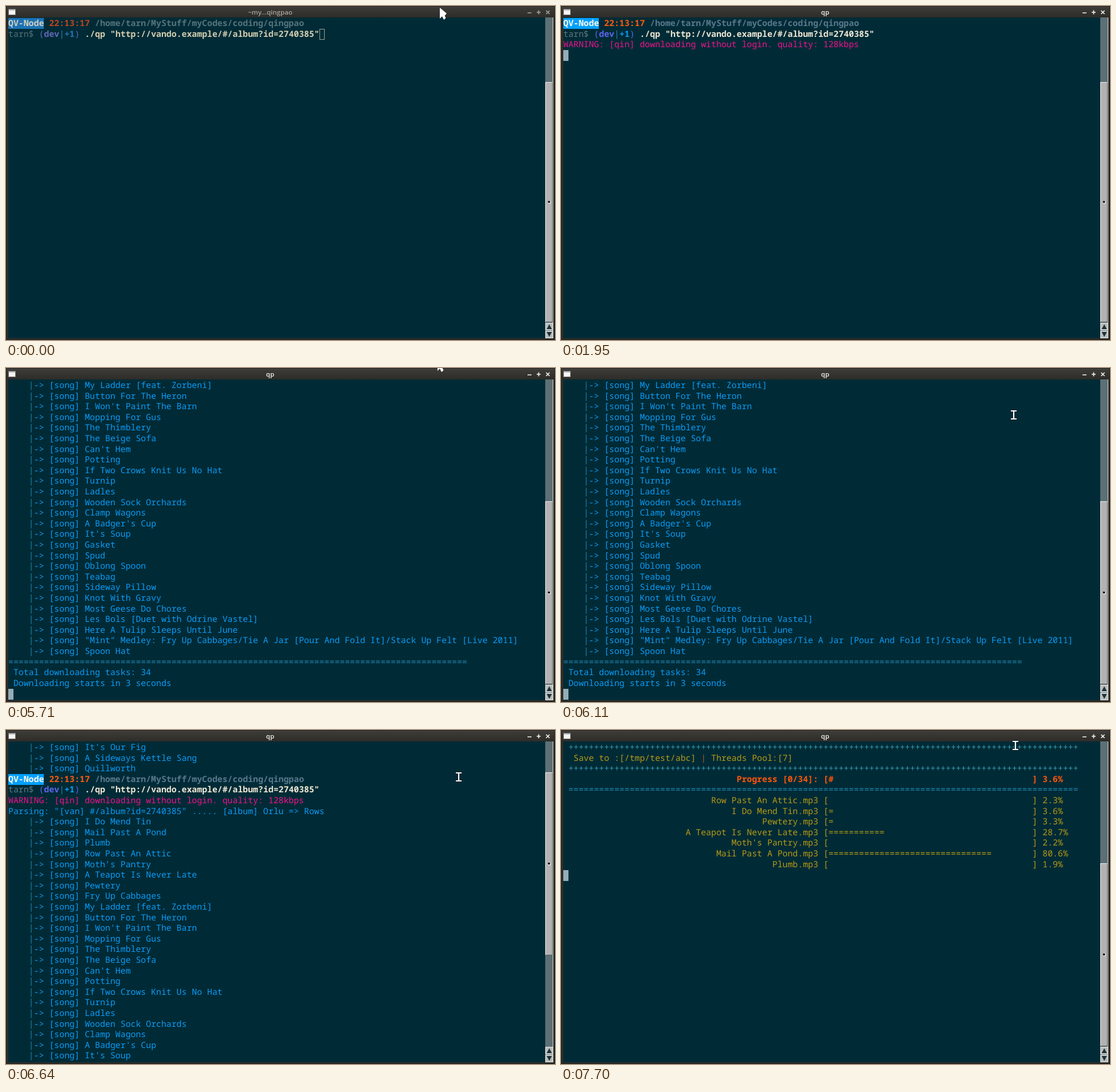
These frames come from a looping animation (958x584 px, 8000 ms). An HTML page:

```html
<!DOCTYPE html>
<html lang="en">
<head>
<meta charset="utf-8">
<title>Terminal</title>
<style>
html, body { margin: 0; width: 100%; height: 100%; overflow: hidden; background: #2e2d2a; }
#win {
  position: relative; width: 958px; height: 584px; overflow: hidden; background: #2e2d2a;
  --host: #00a0ff; --hostText: #fdf9ec; --time: #ff5a0e; --path: #58788c; --user: #5f7780;
  --branch: #5d66ee; --blue: #0c9af6; --cmd: #eee8d5; --ctl: #f5f3ee;
}
#win.dim {
  --host: #1c72b4; --hostText: #d3cfbd; --time: #c0451b; --path: #54747e; --user: #54707a;
  --branch: #6269b8; --blue: #2078b8; --cmd: #d3cdb0; --ctl: #a8a59b;
}
#bar { position: absolute; left: 0; top: 0; width: 958px; height: 20px;
  background: linear-gradient(#1f1e1c 1px, #504e48 1px, #3d3c37 2px, #2d2c28 20px); }
#edge { position: absolute; inset: 0; box-shadow: inset 0 0 0 1px #1f1e1c; }
#title { position: absolute; left: 361px; width: 200px; top: 1px; line-height: 19px; text-align: center;
  font: 600 11.5px/19px "Open Sans", "Noto Sans", sans-serif; color: var(--ctl); white-space: pre; }
#term { position: absolute; left: 4px; top: 20px; width: 937px; height: 561px; background: #002b36; }
#rows { position: absolute; left: 0; top: 0; }
#rows div { position: absolute; left: 4px; height: 19px; white-space: pre;
  font: 14.83px/19px "Noto Sans Mono", "DejaVu Sans Mono", monospace;
  font-variant-ligatures: none; text-rendering: geometricPrecision; color: var(--blue); }
#rows b { font-weight: 700; }
#rows span, #rows b { color: var(--c); }
#rows .host { display: inline-block; height: 19px; background: var(--host); --c: var(--hostText); }
.time { --c: var(--time); } .path { --c: var(--path); } .user { --c: var(--user); }
.branch { --c: var(--branch); } .blue { --c: var(--blue); } .cmd { --c: var(--cmd); }
.warn { --c: #f0128f; } .pipe { --c: #2385b4; } .rule { --c: #2388b4; }
.plus { --c: #3698ae; } .olive { --c: #b59a16; } .orange { --c: #ff560a; } .sep { --c: #b85426; }
#caret { position: absolute; width: 9px; height: 19px; box-sizing: border-box; background: #93adb9; }
.dim #caret { background: none; border: 1px solid #9aa596; }
#scroll { position: absolute; left: 941px; top: 20px; width: 14px; height: 561px; box-sizing: border-box;
  background: #5c7076; border-right: 1px solid #d0d4d4; }
#thumb { position: absolute; left: 941px; width: 13px; box-sizing: border-box; background: #b2b2b2;
  border: 1px solid; border-color: #eee #55595a #55595a #eee; }
svg { position: absolute; left: 0; top: 0; }
#ctl { fill: none; stroke: var(--ctl); stroke-width: 1.7; }
</style>
</head>
<body>
<div id="win">
  <div id="bar"></div>
  <div id="edge"></div>
  <div id="title"></div>
  <div id="term"></div>
  <div id="caret"></div>
  <div id="rows"></div>
  <div id="scroll"></div>
  <div id="thumb"></div>
  <svg width="958" height="584">
    <rect x="4.5" y="5.5" width="12" height="10" fill="#f4f4f2" stroke="#77756f"/>
    <path d="M5 7H16" stroke="#b9bfc8" stroke-width="2"/>
    <path id="ctl" d="M910 12H917M926 11H933M929.500 7.500V14.500M942.500 8L948.500 14M948.500 8L942.500 14"/>
    <g fill="#b8bcbb" stroke="#e4e6e5"><rect x="941.5" y="554.500" width="13" height="12"/><rect x="941.5" y="568.500" width="13" height="12"/></g>
    <path d="M948 556.500L952.500 565H943.500ZM948 578.500L952.500 570H943.500Z" fill="#1c3238"/>
    <g id="dot"><circle cx="948" r="2.700" fill="#eee"/><circle cx="947.5" cy="-.5" r="2" fill="#111"/></g>
    <path id="arrow" d="M0 0V19L4 15L7 21L10.500 18L8.500 14L12 10Z" fill="#fff"/>
    <g id="beam" fill="none"><path d="M-5 -7H5M-5 7H5M0 -7V7" stroke="#02222b" stroke-width="4"/><path d="M-5 -7H5M-5 7H5M0 -7V7" stroke="#fff" stroke-width="2.200"/></g>
  </svg>
</div>
<script>
const $ = id => document.getElementById(id);
const LOOP = 8000, PITCH = 8.898, ROW = 18.6, TOP = 21, VIEW = 30, PAST = 8;
const rowY = (i, nudge = 0) => Math.round(TOP + nudge + ROW * i);
const esc = s => s.replace(/&/g, "&amp;").replace(/</g, "&lt;").replace(/>/g, "&gt;");
const span = (cls, s) => `<span class="${cls}">${esc(s)}</span>`;
const bold = (cls, s) => `<b class="${cls}">${esc(s)}</b>`;

const prompt = (time, query) => [
  bold("host", "QV-Node") + bold("time", ` ${time}`) + bold("path", " /home/tarn/MyStuff/myCodes/coding/qingpao"),
  span("user", "tarn$ ") + span("branch", "(") + bold("branch", "dev") + span("pipe", "|") +
    bold("blue", "+1") + span("branch", ") ") + bold("cmd", `./qp "http://vando.example/#/${query}"`)
];
const warning = span("warn", "WARNING: [qin] downloading without login. quality: 128kbps");
const parsing = (query, found) => esc(`Parsing: "[van] #/${query}" ..... ${found}`);
const song = name => "    " + span("pipe", "|") + esc(`-> [song] ${name}`);

const older = ["By Our Paper Door", "It's Our Fig", "A Sideways Kettle Sang", "Quillworth"];
const songs = [
  "I Do Mend Tin", "Mail Past A Pond", "Plumb", "Row Past An Attic", "Moth's Pantry",
  "A Teapot Is Never Late", "Pewtery", "Fry Up Cabbages", "My Ladder [feat. Zorbeni]",
  "Button For The Heron", "I Won't Paint The Barn", "Mopping For Gus", "The Thimblery",
  "The Beige Sofa", "Can't Hem", "Potting", "If Two Crows Knit Us No Hat", "Turnip", "Ladles",
  "Wooden Sock Orchards", "Clamp Wagons", "A Badger's Cup", "It's Soup", "Gasket", "Spud",
  "Oblong Spoon", "Teabag", "Sideway Pillow", "Knot With Gravy", "Most Geese Do Chores",
  "Les Bols [Duet with Odrine Vastel]", "Here A Tulip Sleeps Until June",
  '"Mint" Medley: Fry Up Cabbages/Tie A Jar [Pour And Fold It]/Stack Up Felt [Live 2011]',
  "Spoon Hat"
];
const A = "artist?id=52706", B = "album?id=2740385";
const buffer = [
  ...prompt("22:08:53", A), warning, parsing(A, "[artist TopN] Tobrick Valen"), ...older.map(song),
  ...prompt("22:13:17", B), warning, parsing(B, "[album] Orlu => Rows"), ...songs.map(song),
  span("rule", "=".repeat(90)),
  ` Total downloading tasks: ${songs.length}`, " Downloading starts in 3 seconds"
];

// [song index, percent at the end]
const jobs = [[3, 2.3], [0, 3.6], [6, 3.3], [5, 28.7], [4, 2.2], [1, 80.6], [2, 1.9]];
const meter = (label, mark, pct) =>
  label.padStart(50) + " [" + mark.repeat(Math.floor(pct * 0.4)).padEnd(40) + `] ${pct.toFixed(1)}%`;
function downloads(k) {
  const sum = jobs.reduce((s, j) => s + j[1] * k, 0), n = songs.length;
  const plus = span("plus", " " + "+".repeat(100));
  return [
    plus,
    span("olive", "  Save to :[/tmp/test/abc] ") + span("sep", "|") + span("olive", " Threads Pool:[7]"),
    plus,
    bold("orange", meter(`Progress [0/${n}]:`, "#", sum / n)),
    span("rule", " " + "=".repeat(100)),
    ...jobs.map(([i, p]) => span("olive", meter(songs[i] + ".mp3", "=", p * k)))
  ];
}

// Pointer legs: start, end, from x, y, to x, y
const legs = [
  [0, 680, 757, 3, 757, 3], [680, 720, 755, -8, 755, -8],
  [5710, 6110, 753, -14, 790, 82], [6110, 6640, 790, 82, 790, 82],
  [6640, 6800, 790, 82, 790, 88], [6800, 7420, 790, 88, 790, 88],
  [7420, 7700, 790, 88, 793, 27], [7700, LOOP, 793, 27, 793, 27]
];
function pointer(t) {
  const leg = legs.find(l => t >= l[0] && t < l[1]);
  if (!leg) return null;
  const [a, b, x0, y0, x1, y1] = leg;
  const k = Math.floor((t - a) / 40) * 40 / (b - a);
  return [x0 + (x1 - x0) * k, y0 + (y1 - y0) * k];
}

// View offset in lines once the list is printed
const wheel = [[3530, 20], [6190, 15], [6230, 10], [6280, 5], [6320, 0],
  [6640, 5], [6680, 10], [6720, 15], [6760, 20]];

function screen(t) {
  if (t < 3530) {
    const n = t < 1950 ? 2 : 3;
    const caret = t < 1820 ? [61, 1] : [0, n];
    return { rows: buffer.slice(PAST, PAST + n), off: PAST, total: PAST + VIEW, caret };
  }
  const total = buffer.length + 1;
  if (t >= 7500) {
    const k = Math.min(1, 0.5 + Math.floor((t - 7500) / 40) * 0.1);
    const rows = downloads(k);
    return { rows, off: total - VIEW, total, caret: [0, rows.length] };
  }
  const off = wheel.filter(w => w[0] <= t).pop()[1];
  return { rows: buffer.slice(off, off + VIEW), off, total, caret: [0, buffer.length - off] };
}

function place(el, show, p) {
  el.style.display = show ? "" : "none";
  if (show) el.setAttribute("transform", `translate(${Math.round(p[0])} ${Math.round(p[1])})`);
}

let last = "";
function draw(t) {
  const s = screen(t), html = s.rows.map((r, i) => `<div style="top:${rowY(i)}px">${r}</div>`).join("");
  if (html !== last) $("rows").innerHTML = last = html;
  $("win").className = t < 320 ? "dim" : "";
  $("title").textContent = t < 1880 ? "~my...qingpao" : "qp";

  const [col, row] = s.caret, caret = $("caret").style;
  caret.display = row < VIEW ? "" : "none";
  caret.left = Math.round(4 + col * PITCH) + "px";
  caret.top = rowY(row, 0.4) + "px";

  const unit = 532 / s.total, y = Math.floor(TOP + s.off * unit), h = Math.ceil(VIEW * unit);
  $("thumb").style.top = y + "px";
  $("thumb").style.height = h + "px";
  $("dot").setAttribute("transform", `translate(0 ${Math.round(y + h / 2)})`);

  const p = pointer(t), inside = p && p[1] > 20;
  place($("arrow"), p && !inside, p);
  place($("beam"), inside, p);
}

const start = performance.now();
function tick() {
  draw((performance.now() - start) % LOOP);
  requestAnimationFrame(tick);
}
tick();
</script>
</body>
</html>
```
